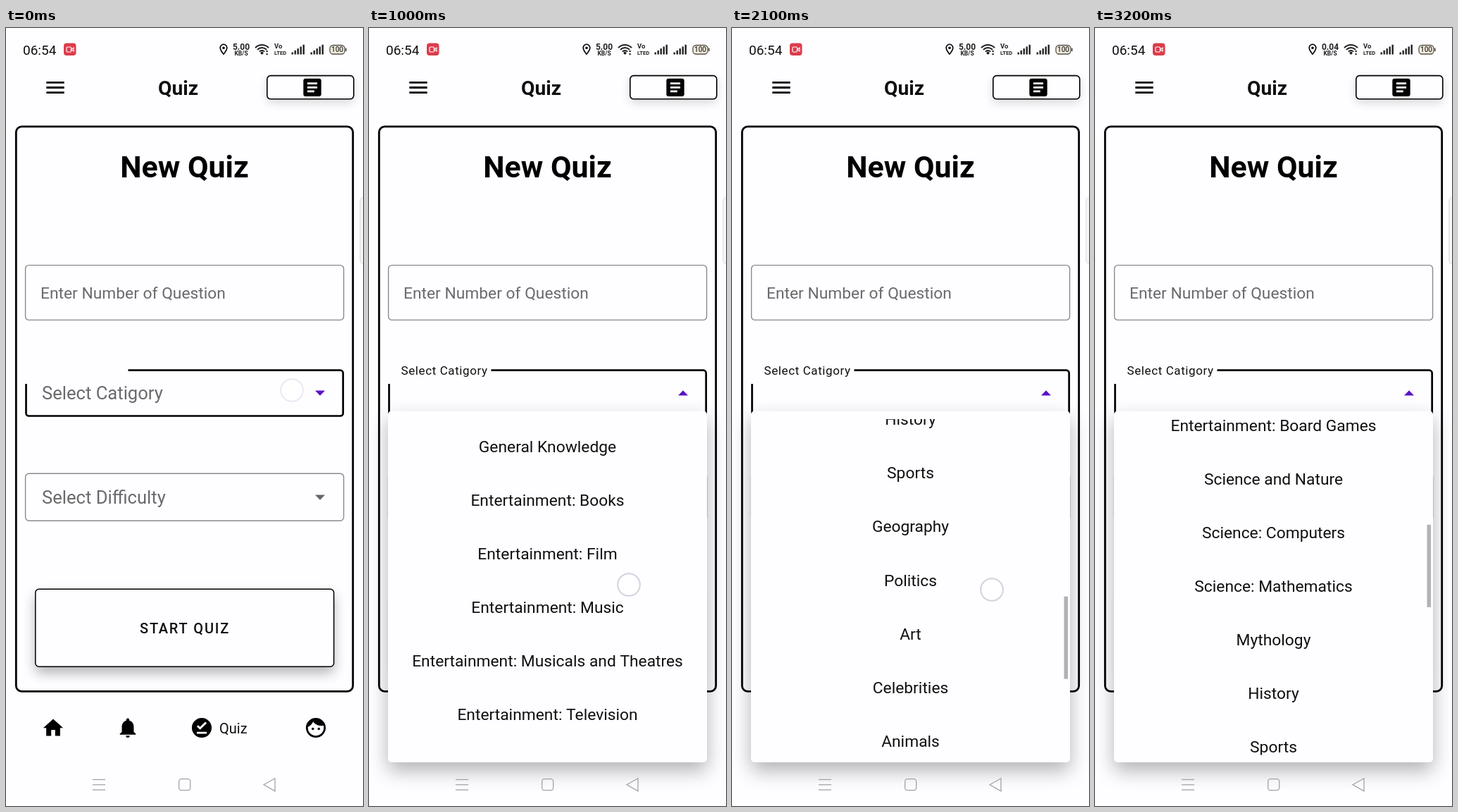
These frames come from a looping animation (507x1104 px, 3.3 s). An HTML page with a canvas:

```html
<!DOCTYPE html>
<html lang="en">
<head>
<meta charset="utf-8">
<title>New Quiz</title>
<style>
html, body { margin: 0; width: 100%; height: 100%; overflow: hidden; background: #fefdff; }
canvas { display: block; width: 507px; height: 1104px; }
</style>
</head>
<body>
<canvas id="stage"></canvas>
<script>
const W = 507, H = 1104, LOOP = 3300, STEP = 100;
const BG = '#fefdff', INK = '#000', TEXT = '#101010', HINT = '#6a696b', PURPLE = '#5a12c6';
const canvas = document.getElementById('stage');
const ctx = canvas.getContext('2d');
const dpr = window.devicePixelRatio || 1;
canvas.width = W * dpr;
canvas.height = H * dpr;

const ITEMS = [
  'General Knowledge', 'Entertainment: Books', 'Entertainment: Film', 'Entertainment: Music',
  'Entertainment: Musicals and Theatres', 'Entertainment: Television', 'Entertainment: Video Games',
  'Entertainment: Board Games', 'Science and Nature', 'Science: Computers', 'Science: Mathematics',
  'Mythology', 'History', 'Sports', 'Geography', 'Politics', 'Art', 'Celebrities', 'Animals',
  'Vehicles', 'Entertainment: Comics', 'Science: Gadgets', 'Entertainment: Japanese Anime and Manga',
  'Entertainment: Cartoon and Animations'
];
const ROW = 76.06, FIRST_Y = 593.6, MAX_SCROLL = 1349;

// Keyframes: [ms, value]
const SCROLL = [
  [1000, 0], [1100, 60], [1200, 300], [1300, 545], [1400, 742], [1500, 850], [1600, 905],
  [1700, 931], [1800, 944], [1900, 949], [2000, 951], [2100, 951], [2200, 1005], [2300, 1140],
  [2400, 1290], [2500, MAX_SCROLL], [2800, MAX_SCROLL], [2900, 1295], [3000, 1085], [3100, 810], [3200, 562.5]
];
const OPEN = [[0, 0], [100, 0.35], [200, 0.93], [300, 1]];
const PRESS = [[0, 0], [100, 0.12], [200, 0.215], [300, 0.09], [400, 0]];
const GLOW = [[2400, 0], [2500, 1], [2600, 0.65], [2700, 0.25], [2800, 0]];

// Finger drags: start, end, x, y at start, y at end
const TOUCHES = [
  [0, 0, 406, 514, 514], [1000, 1100, 369, 790, 730],
  [2100, 2200, 369, 797, 743], [2800, 2900, 369, 740, 794]
];

const ICONS = {
  menu: 'M3 18h18v-2H3v2zm0-5h18v-2H3v2zm0-7v2h18V6H3z',
  article: 'M19 3H5c-1.1 0-2 .9-2 2v14c0 1.1.9 2 2 2h14c1.1 0 2-.9 2-2V5c0-1.1-.9-2-2-2zm-5 14H7v-2h7v2zm3-4H7v-2h10v2zm0-4H7V7h10v2z',
  home: 'M10 20v-6h4v6h5v-8h3L12 3 2 12h3v8z',
  bell: 'M12 22c1.1 0 2-.9 2-2h-4c0 1.1.89 2 2 2zm6-6v-5c0-3.07-1.64-5.64-4.5-6.32V4c0-.83-.67-1.5-1.5-1.5s-1.5.67-1.5 1.5v.68C7.63 5.36 6 7.92 6 11v5l-2 2v1h16v-1l-2-2z',
  check: 'M12 2C6.5 2 2 6.5 2 12s4.5 10 10 10 10-4.5 10-10S17.5 2 12 2zm5 16H7v-2h10v2zm-6.7-4L7 10.7l1.4-1.4 1.9 1.9 5.3-5.3L17 7.3 10.3 14z',
  face: 'M9 11.75c-.69 0-1.25.56-1.25 1.25s.56 1.25 1.25 1.25 1.25-.56 1.25-1.25-.56-1.25-1.25-1.25zm6 0c-.69 0-1.25.56-1.25 1.25s.56 1.25 1.25 1.25 1.25-.56 1.25-1.25-.56-1.25-1.25-1.25zM12 2C6.48 2 2 6.48 2 12s4.48 10 10 10 10-4.48 10-10S17.52 2 12 2zm0 18c-4.41 0-8-3.59-8-8 0-.29.02-.58.05-.86 2.36-1.05 4.23-2.98 5.21-5.37C11.07 8.33 14.05 10 17.42 10c.78 0 1.53-.09 2.25-.26.21.71.33 1.47.33 2.26 0 4.41-3.59 8-8 8z',
  pin: 'M12 2C8.13 2 5 5.13 5 9c0 5.25 7 13 7 13s7-7.75 7-13c0-3.87-3.13-7-7-7zM7 9c0-2.76 2.24-5 5-5s5 2.24 5 5c0 2.88-2.88 7.19-5 9.88C9.92 16.21 7 11.85 7 9z'
};
for (const name in ICONS) ICONS[name] = new Path2D(ICONS[name]);

function at(keys, t) {
  if (t <= keys[0][0]) return keys[0][1];
  for (let i = 1; i < keys.length; i++) {
    const [t0, a] = keys[i - 1], [t1, b] = keys[i];
    if (t <= t1) return a + (b - a) * (t - t0) / (t1 - t0);
  }
  return keys[keys.length - 1][1];
}

function scoped(draw) {
  ctx.save();
  draw();
  ctx.restore();
}

function text(str, x, y, size, { weight = 400, color = TEXT, align = 'left', gap = 0 } = {}) {
  ctx.font = `${weight} ${size}px Roboto, sans-serif`;
  ctx.letterSpacing = gap + 'px';
  ctx.textAlign = align;
  ctx.fillStyle = color;
  ctx.fillText(str, x, y);
}

function icon(name, cx, cy, scale = 1.408) {
  scoped(() => {
    ctx.translate(cx, cy);
    ctx.scale(scale, scale);
    ctx.translate(-12, -12);
    ctx.fillStyle = INK;
    ctx.fill(ICONS[name], 'evenodd');
  });
}

function box(x0, y0, x1, y1, r, { fill, stroke, width = 1, shadow } = {}) {
  ctx.beginPath();
  ctx.roundRect(x0, y0, x1 - x0, y1 - y0, r);
  scoped(() => {
    if (shadow) {
      const [alpha, blur, dy] = shadow;
      ctx.shadowColor = `rgba(0,0,0,${alpha})`;
      ctx.shadowBlur = blur * dpr;
      ctx.shadowOffsetY = dy * dpr;
    }
    if (fill) {
      ctx.fillStyle = fill;
      ctx.fill();
    }
  });
  if (stroke) {
    ctx.strokeStyle = stroke;
    ctx.lineWidth = width;
    ctx.stroke();
  }
}

function line(points, color, width, close) {
  ctx.beginPath();
  points.forEach(([x, y]) => ctx.lineTo(x, y));
  if (close) ctx.closePath();
  ctx.strokeStyle = color;
  ctx.lineWidth = width;
  ctx.stroke();
}

function arrow(y, dir, color) {
  ctx.beginPath();
  ctx.moveTo(439, y - 3.5 * dir);
  ctx.lineTo(453, y - 3.5 * dir);
  ctx.lineTo(446, y + 3.7 * dir);
  ctx.fillStyle = color;
  ctx.fill();
}

function bars(x) {
  ctx.fillStyle = '#222';
  for (let i = 0; i < 5; i++) {
    const h = 3 + i * 2.7;
    ctx.fillRect(x + i * 4, 37.5 - h, 2.4, h);
  }
}

function statusBar(t) {
  const bold = { weight: 700, align: 'center', color: '#222' };
  text('06:54', 24, 38, 19);
  box(82, 21.5, 99.5, 39, 4, { fill: '#dc3c4c' });
  box(86, 27, 92.5, 34, 1.2, { stroke: '#fff', width: 1.2 });
  line([[92.5, 30.5], [96, 28], [96, 33]], '#fff', 1.1, true);
  icon('pin', 309, 30.5, 0.8);
  ctx.beginPath();
  ctx.arc(309, 28.2, 1.8, 0, 7);
  ctx.fillStyle = INK;
  ctx.fill();
  text(t < 2300 ? '5.00' : '0.04', 334, 30.5, 12, bold);
  text('KB/S', 334, 38.5, 8.5, bold);

  ctx.strokeStyle = '#222';
  ctx.lineWidth = 2;
  for (const r of [5, 9, 13]) {
    ctx.beginPath();
    ctx.arc(363.5, 37, r, -Math.PI * 0.76, -Math.PI * 0.24);
    ctx.stroke();
  }
  ctx.fillStyle = '#222';
  ctx.beginPath();
  ctx.arc(363.5, 35.5, 2, 0, 7);
  ctx.fill();
  ctx.fillRect(369.5, 32, 2.2, 2.2);
  ctx.fillRect(369.5, 36, 2.2, 2.2);

  text('Vo', 381, 29, 9.5, { weight: 700, color: '#222' });
  text('LTED', 381, 37.5, 7.6, { weight: 700, color: '#222' });
  bars(405.5);
  bars(432.5);
  box(460, 24.5, 481, 37, 4.5, { fill: '#f3ecdc', stroke: '#55504a', width: 1.3 });
  ctx.fillStyle = '#55504a';
  ctx.fillRect(482, 28.5, 1.6, 4.5);
  text('100', 470.5, 34.4, 10, { weight: 500, align: 'center', color: '#333' });
}

function header() {
  icon('menu', 70, 84.5);
  text('Quiz', 244.5, 95, 28.2, { weight: 700, align: 'center' });
  box(370.8, 67.6, 493.8, 100.8, 5, { fill: BG, stroke: INK, width: 1.6, shadow: [0.16, 14, 5] });
  icon('article', 435, 84.3);
}

function systemNav() {
  const grey = '#a3a2a4';
  for (let i = 0; i < 3; i++) line([[123, 1066.5 + i * 7.3], [141, 1066.5 + i * 7.3]], grey, 1.3);
  box(245.7, 1065.7, 261.7, 1081.7, 3.5, { stroke: grey, width: 1.3 });
  line([[366, 1073.8], [382, 1064.8], [382, 1082.8]], grey, 1.3, true);
}

function categoryField(t) {
  const press = at(PRESS, t);
  if (press > 0) box(27.5, 484.5, 479.5, 552, 5, { fill: `rgba(0,0,0,${press})` });
  ctx.beginPath();
  ctx.moveTo(173.5, 485.7);
  ctx.arcTo(478.7, 485.7, 478.7, 550.5, 4);
  ctx.arcTo(478.7, 550.5, 28.5, 550.5, 4);
  ctx.arcTo(28.5, 550.5, 28.5, 505, 4);
  ctx.lineTo(28.5, 505);
  ctx.strokeStyle = INK;
  ctx.lineWidth = 2.7;
  ctx.stroke();
  if (t < 100) text('Select Catigory', 51, 527, 25.6, { color: HINT });
  else if (t < 200) text('Select Catigory', 48, 506, 20.5, { color: '#333', gap: 0.4 });
  else text('Select Catigory', 45.5, 492.2, 17, { gap: 0.6 });
  arrow(518, t < 100 ? 1 : -1, PURPLE);
}

function page(t) {
  box(14.3, 139.8, 492.7, 941.3, 8, { stroke: INK, width: 2.8 });
  text('New Quiz', 253.5, 212, 42.9, { weight: 700, align: 'center', color: INK });
  box(27.6, 336.6, 479.6, 414.4, 5, { stroke: '#8a898b', width: 1.4 });
  text('Enter Number of Question', 49, 383.5, 22.8, { color: HINT });
  categoryField(t);
  box(27.6, 632.3, 479.6, 699.3, 5, { stroke: '#8a898b', width: 1.4 });
  text('Select Difficulty', 51, 674.7, 25.6, { color: HINT });
  arrow(666, 1, '#656466');
  box(41.8, 796.2, 465.6, 906.3, 5, { fill: BG, stroke: INK, width: 1.5, shadow: [0.3, 18, 9] });
  text('START QUIZ', 190, 859, 20, { weight: 500, gap: 1.8 });

  icon('home', 67, 993.2);
  icon('bell', 173, 993);
  icon('check', 278, 993);
  text('Quiz', 303, 1001, 20);
  icon('face', 440, 993);
  box(503, 241, 512, 334, 4, { fill: '#f8f6f8', stroke: '#dddbde', width: 1.2 });
}

function glow(k) {
  const rise = 32 * k, half = 226.5;
  const r = (half * half + rise * rise) / (2 * rise);
  scoped(() => {
    ctx.beginPath();
    ctx.rect(27, 900, 453, 131);
    ctx.clip();
    ctx.beginPath();
    ctx.arc(253.5, 1031 - 47 * k + r, r, 0, 7);
    ctx.fillStyle = `rgba(98,0,238,${0.1 * Math.min(1, k + 0.2)})`;
    ctx.fill();
  });
}

function popup(t) {
  const open = at(OPEN, t);
  if (open <= 0) return;
  const scroll = at(SCROLL, t), k = at(GLOW, t);
  scoped(() => {
    ctx.beginPath();
    ctx.rect(0, 0, W, 1088);
    ctx.clip();
    ctx.globalAlpha = open;
    const scale = 1 - 0.064 * (1 - open);
    ctx.translate(253.5, 543);
    ctx.scale(scale, scale);
    ctx.translate(-253.5, -543);
    box(27, 543.5, 480, 1042, 5, { fill: BG, shadow: [0.3, 28, 12] });

    scoped(() => {
      ctx.beginPath();
      ctx.rect(49, 555, 409, 476.5);
      ctx.clip();
      ITEMS.forEach((item, i) => {
        const y = FIRST_Y + i * ROW - scroll;
        if (y > 530 && y < 1055) text(item, 253.5, y + 8, 22.8, { align: 'center' });
      });
    });
    if (k > 0) glow(k);
    if (t >= 1100) {
      ctx.fillStyle = '#b2b1b3';
      ctx.fillRect(471.5, 557.5 + scroll * 0.262, 5.6, 117);
    }
  });
}

function finger(t) {
  for (const [t0, t1, x, y0, y1] of TOUCHES) {
    if (t < t0 || t > t1) continue;
    const y = y0 + (y1 - y0) * (t1 > t0 ? (t - t0) / (t1 - t0) : 0);
    ctx.beginPath();
    ctx.arc(x, y, 15.8, 0, 7);
    ctx.fillStyle = 'rgba(255,255,255,0.75)';
    ctx.fill();
    ctx.strokeStyle = t0 === 0 ? '#eae8f3' : '#d3d1e0';
    ctx.lineWidth = 2;
    ctx.stroke();
  }
}

function draw(t) {
  ctx.setTransform(dpr, 0, 0, dpr, 0, 0);
  ctx.fillStyle = BG;
  ctx.fillRect(0, 0, W, H);
  statusBar(t);
  header();
  page(t);
  popup(t);
  systemNav();
  finger(t);
}

const start = performance.now();
function tick() {
  const t = (performance.now() - start) % LOOP;
  draw(Math.floor(t / STEP) * STEP);
  requestAnimationFrame(tick);
}
tick();
</script>
</body>
</html>
```
